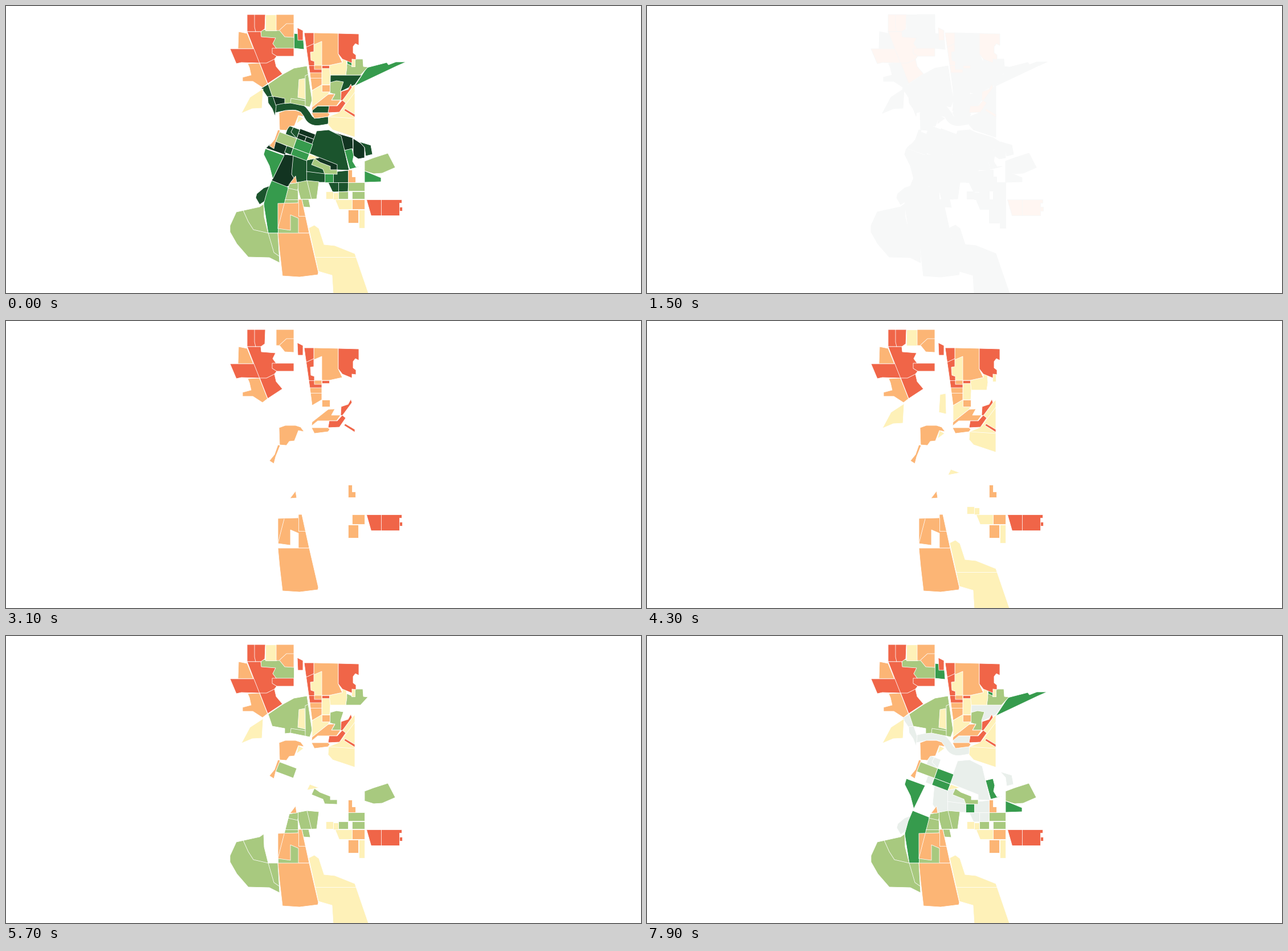
Write a matplotlib script that moves like this. It is 1114 by 503 pixels and loops after 8 s.

```python
import math
import numpy as np
import matplotlib.pyplot as plt
from matplotlib.animation import FuncAnimation
from matplotlib.patches import Polygon

W, H, DPI = 1114, 503, 64
STEP, LOOP = 100, 8000
FADE_OUT, FADE_LEN, RETURN = 1000, 500, 2500
LINE = 0.8 * 72 / DPI

# Map classes, from the lowest value to the highest
RED, ORANGE, YELLOW, LIGHT, GREEN, DARK, DEEP = range(7)
COLORS = [(240, 101, 72), (252, 181, 117), (254, 241, 184), (168, 201, 127),
          (54, 155, 77), (27, 84, 45), (18, 52, 33)]
STARTS = [2400, 2400, 3800, 5100, 6500, 7800, LOOP]
GHOST, RED_GHOST = (247, 248, 248), (255, 246, 242)

fig = plt.figure(figsize=(W / DPI, H / DPI), dpi=DPI, facecolor="white")
ax = fig.add_axes([0, 0, 1, 1])
ax.set_xlim(0, W)
ax.set_ylim(H, 0)
ax.axis("off")

areas, borders = [], []


def area(level, *xy):
    """A district; lower classes cover higher ones, so those may run beneath."""
    patch = Polygon(np.reshape(xy, (-1, 2)), lw=LINE, joinstyle="round", zorder=10 - level)
    ax.add_patch(patch)
    areas.append((level, patch))


def box(level, x0, y0, x1, y1):
    area(level, x0, y0, x1, y0, x1, y1, x0, y1)


def cut(level, *xy):
    """A border line inside a district."""
    line, = ax.plot(xy[::2], xy[1::2], lw=LINE, zorder=10.5 - level)
    borders.append(line)


def block(level, u0, u1, v0, v1):
    """A block of the slanted downtown street grid."""
    corners = [(u0, v0), (u1, v0), (u1, v1), (u0, v1)]
    area(level, *[c for u, v in corners for c in (516 + 28 * u - 6 * v, 215 + 10.5 * u + 17 * v)])


def smooth(points, n=8):
    """Catmull-Rom curve through the points."""
    p = np.array([points[0], *points, points[-1]], float)
    t = np.linspace(0, 1, n, endpoint=False)[:, None]
    curve = [b + t / 2 * (c - a + t * (2 * a - 5 * b + 4 * c - d + t * (3 * (b - c) + d - a)))
             for a, b, c, d in zip(p, p[1:], p[2:], p[3:])]
    return np.vstack([*curve, p[-1:]])


def ribbon(level, width, *points):
    mid = smooth(points)
    dx, dy = np.gradient(mid, axis=0).T
    side = np.column_stack([-dy, dx]) / np.hypot(dx, dy)[:, None] * width / 2
    area(level, *np.vstack([mid + side, (mid - side)[::-1]]).ravel())


# North-west
area(RED, 423, 15, 455, 15, 454, 40, 447, 45, 423, 45)
cut(RED, 436, 15, 436, 37, 438, 45)
area(RED, 423, 45, 447, 45, 448, 54, 473, 56, 468, 66, 474, 74, 505, 74, 505, 88, 475, 88,
     471, 93, 474, 106, 485, 119, 459, 136, 445, 100, 413, 99, 404, 101, 393, 75, 434, 75)
cut(RED, 423, 45, 459, 136)
cut(RED, 445, 100, 457, 100, 471, 93)
cut(RED, 474, 74, 467, 74, 467, 83, 475, 88)
area(ORANGE, 474, 15, 505, 15, 505, 55, 489, 54, 480, 43, 474, 43)
cut(ORANGE, 505, 31, 492, 31, 480, 42)
area(ORANGE, 408, 45, 423, 48, 434, 75, 407, 75)
area(ORANGE, 424, 101, 445, 100, 459, 136, 450, 143, 433, 132, 415, 132, 415, 125, 430, 121, 427, 108)
box(YELLOW, 455, 15, 474, 43)
area(YELLOW, 451, 145, 449, 179, 432, 180, 413, 188, 428, 160)
area(YELLOW, 514, 129, 524, 127, 525, 163, 512, 160)
box(LIGHT, 447, 41, 505, 74)
area(LIGHT, 460, 137, 485, 120, 505, 109, 528, 105, 537, 165, 533, 177, 499, 170, 489, 171, 489, 162, 467, 158)
cut(LIGHT, 530, 120, 525, 122, 525, 176)
cut(LIGHT, 499, 170, 500, 162, 525, 166)
area(GREEN, 505, 48, 521, 50, 523, 76, 505, 74)
area(DARK, 448, 144, 460, 137, 468, 158, 459, 160)
box(DEEP, 466, 158, 489, 174)

# North-east
area(RED, 511, 38, 521, 43, 521, 60, 512, 60)
area(RED, 523, 47, 540, 47, 540, 80, 534, 81, 535, 95, 541, 97, 541, 111, 554, 111, 554, 117, 533, 117)
cut(RED, 527, 72, 540, 66)
cut(RED, 531, 104, 541, 104)
box(RED, 554, 104, 567, 109)
area(RED, 583, 48, 619, 49, 619, 69, 613, 66, 609, 71, 609, 82, 614, 86, 614, 94, 607, 93, 607, 100, 590, 93, 583, 84)
area(RED, 605, 137, 607, 143, 590, 166, 587, 165, 588, 150, 600, 146)
area(RED, 567, 175, 581, 175, 590, 165, 596, 170, 585, 186, 565, 187)
area(RED, 595, 180, 612, 190, 612, 195, 593, 183)
area(ORANGE, 540, 47, 583, 48, 583, 84, 590, 99, 567, 104, 554, 104, 554, 62, 540, 68)
area(ORANGE, 541, 104, 554, 104, 554, 138, 537, 148, 533, 117)
cut(ORANGE, 534, 126, 554, 126)
box(ORANGE, 554, 138, 568, 150)
area(ORANGE, 565, 155, 577, 154, 571, 165, 587, 165, 580, 175, 547, 175, 536, 184, 537, 177)
area(ORANGE, 536, 187, 565, 187, 568, 190, 565, 194, 541, 197)
box(YELLOW, 534, 62, 554, 104)
area(YELLOW, 554, 104, 567, 104, 590, 99, 590, 93, 597, 92, 598, 108, 596, 121, 569, 121, 568, 138, 554, 138)
cut(YELLOW, 567, 104, 569, 121)
box(YELLOW, 606, 92, 612, 106)
area(YELLOW, 537, 148, 554, 138, 568, 150, 565, 155, 537, 177)
area(YELLOW, 612, 138, 612, 230, 600, 226, 573, 217, 565, 208, 566, 194, 583, 187, 590, 166, 607, 143)
cut(YELLOW, 612, 151, 588, 183)
cut(YELLOW, 566, 194, 612, 197)
area(LIGHT, 598, 101, 607, 105, 612, 93, 626, 93, 627, 106, 635, 107, 622, 121, 596, 121)
area(LIGHT, 569, 134, 580, 131, 592, 133, 587, 148, 588, 165, 571, 165, 577, 155, 568, 152)
area(GREEN, 612, 140, 633, 108, 668, 99, 671, 103, 684, 98, 702, 98, 686, 105)
box(GREEN, 598, 95, 607, 106)
area(DARK, 569, 121, 624, 121, 612, 138, 587, 150, 569, 135)
box(DARK, 537, 175, 567, 187)

# River
ribbon(DARK, 13, (470, 181), (489, 177), (507, 176), (519, 180), (527, 189), (534, 199), (545, 203), (566, 200))
area(DARK, 459, 159, 468, 158, 474, 176, 472, 193, 467, 180, 460, 170)
area(ORANGE, 479, 187, 490, 183, 508, 183, 517, 186, 523, 194, 513, 192, 506, 210, 497, 211, 492, 218, 480, 217)
area(ORANGE, 477, 217, 481, 218, 473, 238, 470, 250, 462, 245, 471, 234)
area(YELLOW, 513, 192, 522, 197, 510, 206)

# Downtown
block(DEEP, 0, 1, 0, 0.5)
for u in (0, 0.5):
    block(DEEP, u, u + 0.5, 0.5, 1)
block(LIGHT, -1.1, 0, 1, 2)
block(GREEN, 0, 1, 1, 2)
block(GREEN, 0, 1, 2, 2.7)
block(DARK, -0.4, 0, 2, 2.7)
block(DARK, -0.7, 0, 0.1, 1)
cut(DARK, 505, 211, 500, 221, 510, 232)
area(DEEP, 473, 236, 494, 246, 490, 261, 456, 249, 461, 244)
area(DEEP, 488, 260, 505, 262, 502, 295, 510, 309, 490, 318, 466, 306)
area(DEEP, 566, 217, 577, 222, 608, 231, 609, 250, 594, 253, 580, 225)
area(DEEP, 609, 232, 629, 245, 629, 266, 618, 268, 609, 262)
box(DEEP, 541, 262, 581, 290)
area(DARK, 545, 219, 566, 217, 588, 228, 594, 253, 602, 288, 581, 287, 581, 278, 531, 258)
area(DARK, 504, 262, 527, 270, 541, 267, 556, 286, 581, 290, 602, 288, 600, 325, 573, 326, 565, 309, 510, 309, 501, 295)
cut(DARK, 527, 270, 527, 309)
cut(DARK, 527, 290, 559, 294)
cut(DARK, 565, 309, 600, 309)
cut(DARK, 583, 309, 583, 326)
area(DARK, 620, 238, 640, 244, 643, 260, 631, 263, 629, 248)
area(GREEN, 455, 250, 488, 262, 468, 303, 462, 280, 452, 260)
area(GREEN, 594, 253, 607, 250, 610, 262, 608, 272, 614, 282, 623, 281, 603, 286)
area(GREEN, 629, 289, 658, 301, 658, 308, 629, 309)
box(GREEN, 559, 294, 574, 309)
area(LIGHT, 541, 267, 551, 274, 569, 281, 569, 287, 581, 287, 581, 295, 559, 294, 556, 286, 536, 278)
area(LIGHT, 629, 272, 645, 266, 670, 258, 683, 283, 660, 293, 645, 294, 629, 289)
area(YELLOW, 533, 260, 549, 266, 528, 270)

# South
area(RED, 632, 339, 694, 339, 694, 345, 690, 345, 690, 367, 640, 367)
cut(RED, 658, 339, 658, 367)
box(RED, 690, 352, 695, 359)
area(ORANGE, 508, 298, 510, 310, 498, 311)
area(ORANGE, 600, 287, 607, 287, 607, 299, 613, 299, 613, 309, 600, 309)
box(ORANGE, 607, 339, 629, 356)
box(ORANGE, 600, 357, 618, 380)
area(ORANGE, 477, 346, 513, 345, 513, 339, 519, 339, 532, 398, 513, 398, 513, 372, 499, 366, 499, 393, 477, 390)
cut(ORANGE, 488, 347, 481, 374, 477, 390)
cut(ORANGE, 513, 345, 513, 368, 525, 368)
area(ORANGE, 477, 398, 532, 398, 548, 467, 547, 471, 515, 475, 485, 473, 480, 430)
box(YELLOW, 561, 325, 574, 338)
box(YELLOW, 574, 327, 583, 339)
area(YELLOW, 577, 339, 607, 339, 607, 356, 584, 356)
box(YELLOW, 619, 357, 629, 389)
area(YELLOW, 531, 389, 541, 384, 549, 390, 558, 418, 577, 420, 612, 434, 636, 504, 574, 504, 572, 472, 548, 465)
cut(YELLOW, 543, 440, 613, 440)
area(LIGHT, 497, 312, 528, 306, 549, 308, 545, 338, 517, 339, 512, 320, 513, 345, 488, 347)
cut(LIGHT, 494, 319, 512, 323)
cut(LIGHT, 489, 339, 513, 339)
cut(LIGHT, 512, 309, 512, 323)
cut(LIGHT, 528, 306, 536, 339)
area(LIGHT, 519, 339, 531, 339, 534, 353, 522, 352)
box(LIGHT, 600, 309, 629, 324)
box(LIGHT, 583, 325, 600, 338)
box(LIGHT, 607, 325, 629, 338)
box(LIGHT, 477, 365, 513, 398)
area(LIGHT, 404, 361, 445, 352, 452, 347, 453, 370, 460, 398, 477, 398, 480, 450, 462, 441,
     425, 440, 405, 417, 393, 396, 393, 385)
cut(LIGHT, 416, 358, 425, 378, 434, 392, 460, 398, 470, 432, 480, 439)
area(GREEN, 466, 306, 496, 318, 489, 346, 477, 398, 460, 398, 452, 347, 458, 325)
area(DARK, 440, 329, 452, 319, 466, 314, 457, 340, 445, 348, 438, 336)


def ease(t, start):
    u = min(max((t - start) / FADE_LEN, 0), 1)
    return (1 - math.cos(math.pi * u)) / 2


def rgb(color, alpha=1):
    return tuple((255 + (c - 255) * alpha) / 255 for c in color)


def draw(i):
    t = i * STEP
    ghost = FADE_OUT + FADE_LEN <= t < RETURN
    edge = rgb(GHOST) if ghost else "white"
    for level, patch in areas:
        alpha = ease(t, STARTS[level]) if t >= RETURN else 1 - ease(t, FADE_OUT)
        if ghost:
            face = rgb(RED_GHOST if level == RED else GHOST)
        else:
            face = rgb(COLORS[level], alpha)
        patch.set(facecolor=face, edgecolor=edge, visible=ghost or alpha > 0)
    for line in borders:
        line.set_color(edge)
    return [patch for _, patch in areas] + borders


anim = FuncAnimation(fig, draw, frames=LOOP // STEP, interval=STEP,
                     repeat=True, repeat_delay=0, blit=False)
plt.show()
```
